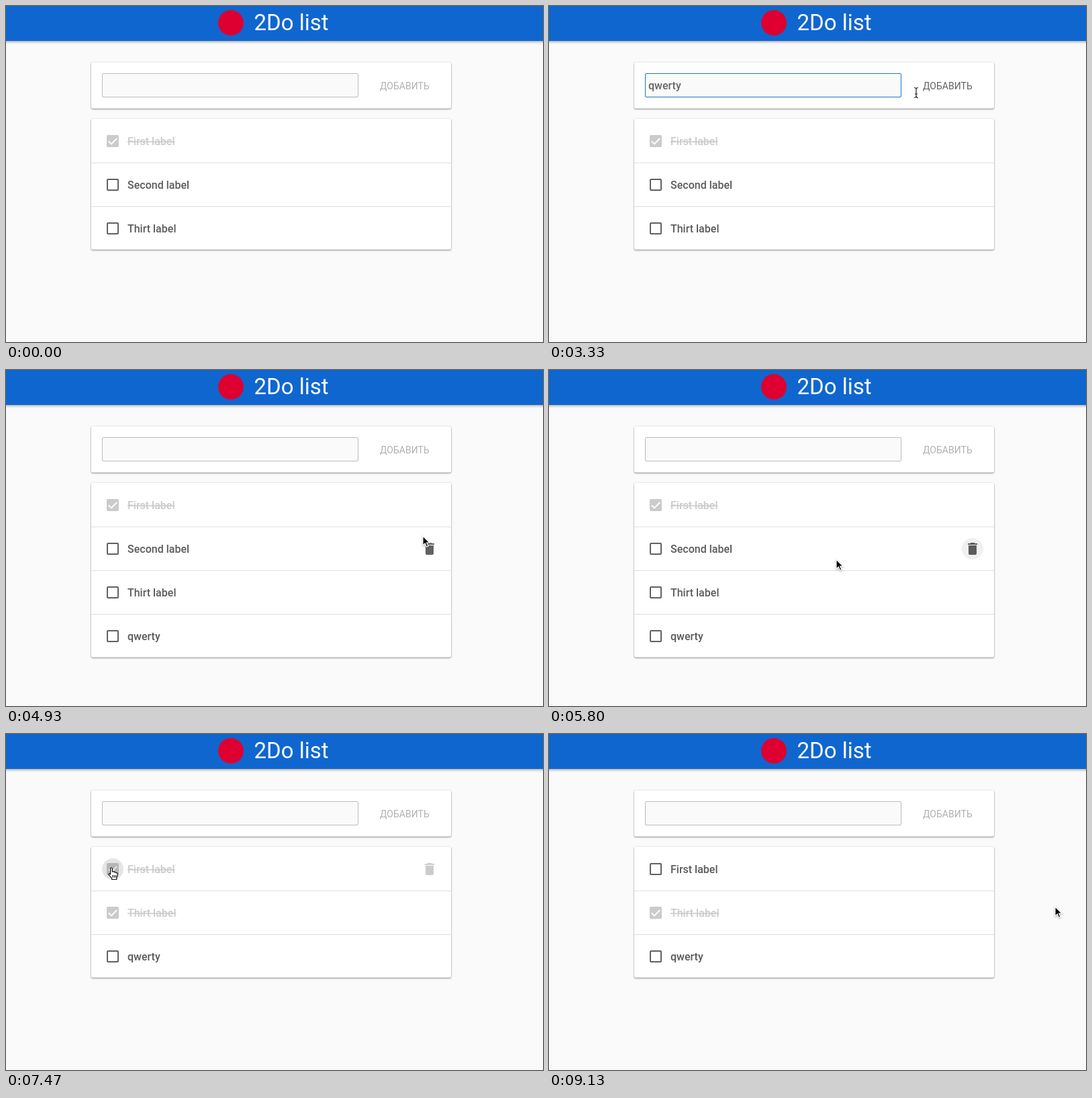
These frames come from a looping animation (800 px wide and 500 px high, 9530 ms). An HTML page:

```html
<!DOCTYPE html>
<html lang="ru">
<head>
<meta charset="utf-8">
<title>2Do list</title>
<style>
  html, body { margin: 0; width: 100%; height: 100%; overflow: hidden; background: #fafafa; }
  svg { display: block; width: 800px; height: 500px; font: 500 16px Roboto, sans-serif; }
  .bar { fill: #1066cf; filter: drop-shadow(0 1px 2px rgba(0, 0, 0, .4)); }
  .title { font-size: 33px; font-weight: 400; fill: #fff; }
  .card { fill: #fff; filter: drop-shadow(0 1px 1px rgba(0, 0, 0, .42)) drop-shadow(0 0 1px rgba(0, 0, 0, .1)); }
  #field { fill: #fafafa; stroke: #bdbdbd; }
  #field.focus { stroke: #1976d2; }
  #typed { fill: #666; }
  #add { font-size: 14px; font-weight: 400; }
  .line { fill: #e0e0e0; }
  .box { fill: none; stroke: #616161; stroke-width: 2; }
  .tick { fill: none; stroke: #fff; stroke-width: 2; visibility: hidden; }
  .label { fill: #5a5a5a; }
  .bin { fill: #616161; }
  .done .box { fill: #cbcbcb; stroke: #cbcbcb; }
  .done .tick { visibility: inherit; }
  .done .label { fill: #cbcbcb; text-decoration: line-through; }
  .done .bin { fill: #cbcbcb; }
  #arrow { filter: drop-shadow(0 1px 1px rgba(0, 0, 0, .35)); }
</style>
</head>
<body>
<svg viewBox="0 0 800 500">
  <rect class="bar" x="-5" y="-5" width="810" height="57"/>
  <circle cx="335" cy="25" r="19" fill="#dd0031"/>
  <text class="title" x="369.5" y="36">2Do list</text>

  <rect class="card" x="127" y="84" width="536" height="68.5" rx="2"/>
  <rect id="field" x="143.5" y="100.5" width="381" height="35" rx="1.5"/>
  <text id="typed" x="148" y="124"></text>
  <rect id="caret" y="109" width="1" height="20" fill="#555"/>
  <rect id="shade" x="541" y="100" width="106" height="36" rx="2"/>
  <text id="add" x="557" y="123.5">ДОБАВИТЬ</text>

  <rect id="list" class="card" x="127" y="168" width="536" rx="2"/>
  <g id="rows"></g>
  <circle id="ripple" r="16"/>

  <g id="cursor">
    <path id="arrow" d="M0 0v14l3.3-3 2.3 5.3 2.4-1-2.3-5.2H10z" stroke="#fff" stroke-width="1.2"/>
    <g id="ibeam" fill="none">
      <path d="M-3-7.5Q0-7.5 0-5Q0-7.5 3-7.5M0-6V6M-3 7.5Q0 7.5 0 5Q0 7.5 3 7.5M-2 2H2" stroke="#fff" stroke-width="2.4"/>
      <path d="M-3-7.5Q0-7.5 0-5Q0-7.5 3-7.5M0-6V6M-3 7.5Q0 7.5 0 5Q0 7.5 3 7.5M-2 2H2" stroke="#222" stroke-width="1.2"/>
    </g>
    <path id="hand" fill="#fff" stroke="#111" stroke-width="1.2" stroke-linejoin="round"
      d="M-1.4 10V1.6Q-1.4 0 0 0T1.4 1.6V6Q3.6 4.8 4.3 6.8Q6.3 5.8 7 7.8Q9.6 7.2 9.4 9.6Q9.4 13 7.8 15V17.5H.6V15.7L-3.8 10.8Q-4.6 9.2-3.2 8.8Q-2.2 8.8-1.4 10zM2 11v3.5M4.4 11v3.5M6.6 11v3.5"/>
  </g>
</svg>
<script>
const LOOP = 9530, TICK = 1000 / 15;
const ADD = 4130, REMOVE = 5860, CHECK = 7060, UNCHECK = 8260;
const FOCUS = 530, BLUR = 3730;
const KEYS = [2060, 2200, 2260, 2400, 2600, 2730];

// time, x, y of the pointer hotspot
const PATH = [
  [67, 717, 169], [533, 428, 117], [3067, 428, 117], [3133, 440, 118],
  [3333, 547, 129], [3533, 572, 128], [4067, 571, 130], [4333, 565, 135],
  [4600, 578, 170], [4867, 618, 240], [5067, 628, 262], [5200, 633, 268],
  [5600, 633, 268], [5667, 605, 271], [5733, 520, 277], [5800, 428, 282],
  [6000, 240, 300], [6267, 168, 318], [6600, 158, 303], [6667, 158, 270],
  [6733, 157, 267], [7067, 157, 267], [7400, 157, 201], [7467, 157, 199],
  [8200, 157, 199], [9133, 754, 257]
];

// press, start of fade, end of fade, last moment shown, centre
const RIPPLES = [
  [5530, 5600, 6100, REMOVE, 631, 266],
  [6730, 6800, 7133, 7133, 159, 266],
  [7400, 7800, 8133, 8133, 159, 201]
];

const $ = id => document.getElementById(id);
const clamp = v => Math.max(0, Math.min(1, v));
const span = (t, a, b) => clamp((t - a) / (b - a));
const show = (el, on) => { el.style.visibility = on ? 'inherit' : 'hidden'; };

const rows = [0, 1, 2, 3].map(i => {
  const g = document.createElementNS('http://www.w3.org/2000/svg', 'g');
  g.setAttribute('transform', `translate(0 ${168 + 65 * i})`);
  g.innerHTML = `
    ${i ? '<rect class="line" x="127" width="536" height="1"/>' : ''}
    <rect class="box" x="151" y="25" width="16" height="16" rx="1"/>
    <path class="tick" d="M152.8 33.2l4.2 4.2 8.2-8.4"/>
    <text class="label" x="181" y="39"></text>
    <path class="bin" transform="translate(619 21)"
      d="M6 19c0 1.1.9 2 2 2h8c1.1 0 2-.9 2-2V7H6v12zM19 4h-3.5l-1-1h-5l-1 1H5v2h14V4z"/>`;
  $('rows').append(g);
  return { g, label: g.querySelector('.label'), bin: g.querySelector('.bin') };
});

function pointer(t) {
  const i = PATH.findIndex(p => p[0] > t);
  if (i < 0) return PATH.at(-1).slice(1);
  const [a, b] = [PATH[Math.max(0, i - 1)], PATH[i]];
  let k = b === a ? 0 : span(t, a[0], b[0]);
  if (b[0] - a[0] > 400) k = k * k * (3 - 2 * k);
  return [a[1] + (b[1] - a[1]) * k, a[2] + (b[2] - a[2]) * k];
}

function cursorKind(t, x, y, row) {
  if (y > 100 && y < 136 && x > 143 && x < 549) return 'ibeam';
  if (y > 100 && y < 135 && x > 549 && x < 647 && t < ADD) return t > BLUR - 300 ? 'hand' : 'arrow';
  const dy = Math.abs(y - 201 - 65 * row);
  if (row >= 0 && dy < 12 && x > 149 && x < 252) return 'hand';
  if (row >= 0 && dy < 16 && Math.abs(x - 631) < 16) return 'hand';
  return 'arrow';
}

function drawForm(t) {
  const focused = t >= FOCUS && t < BLUR;
  const typing = t >= KEYS[0];
  $('field').classList.toggle('focus', focused);
  $('typed').textContent = t < ADD ? 'qwerty'.slice(0, KEYS.filter(k => t >= k).length) : '';

  const since = t - (typing ? KEYS.filter(k => t >= k).at(-1) : FOCUS - 20);
  show($('caret'), focused && Math.floor(since / 490) % 2 === 0);
  $('caret').setAttribute('x', 148 + $('typed').getComputedTextLength());

  const ready = t < ADD ? span(t, 2000, 2600) : 0;
  const grey = Math.round(176 - 80 * ready);
  $('add').setAttribute('fill', `rgb(${grey},${grey},${grey})`);
  const hover = t >= 3460 && t < 4060 ? .04 : 0;
  const press = t >= BLUR ? .08 * (1 - span(t, 3800, 4060)) : 0;
  $('shade').setAttribute('fill-opacity', hover + press);
}

function drawList(t, x, y, live) {
  const items = [
    ['First label', t < UNCHECK], ['Second label', false],
    ['Thirt label', t >= CHECK], ['qwerty', false]
  ].filter(([name]) => (name !== 'qwerty' || t >= ADD) && (name !== 'Second label' || t < REMOVE));
  const inside = live && x > 127 && x < 663 && y >= 168 && y < 168 + 65 * items.length;
  const hovered = inside ? Math.floor((y - 168) / 65) : -1;

  $('list').setAttribute('height', 65 * items.length - .4);
  rows.forEach(({ g, label, bin }, i) => {
    const item = items[i];
    g.style.display = item ? '' : 'none';
    if (!item) return;
    label.textContent = item[0];
    g.classList.toggle('done', item[1]);
    show(bin, i === hovered);
  });
  return hovered;
}

function drawRipple(t) {
  const hit = RIPPLES.find(r => t >= r[0] && t < r[3]);
  show($('ripple'), hit);
  if (!hit) return;
  $('ripple').setAttribute('cx', hit[4]);
  $('ripple').setAttribute('cy', hit[5]);
  $('ripple').setAttribute('fill-opacity', .1 * (1 - span(t, hit[1], hit[2])));
}

function draw(now) {
  // the screen refreshes fifteen times a second
  const t = Math.floor((now % LOOP + 5) / TICK) * TICK;
  const [x, y] = pointer(t);
  // the pointer hides while keys are being pressed
  const live = t >= 60 && !(t >= KEYS[0] && t < 3130);
  drawForm(t);
  const row = drawList(t, x, y, live);
  drawRipple(t);

  const kind = cursorKind(t, x, y, row);
  show($('cursor'), live);
  $('cursor').setAttribute('transform', `translate(${Math.round(x)} ${Math.round(y)})`);
  for (const id of ['arrow', 'ibeam', 'hand']) show($(id), id === kind);
}

const start = performance.now();
function loop() {
  draw(performance.now() - start);
  requestAnimationFrame(loop);
}
loop();
</script>
</body>
</html>
```
